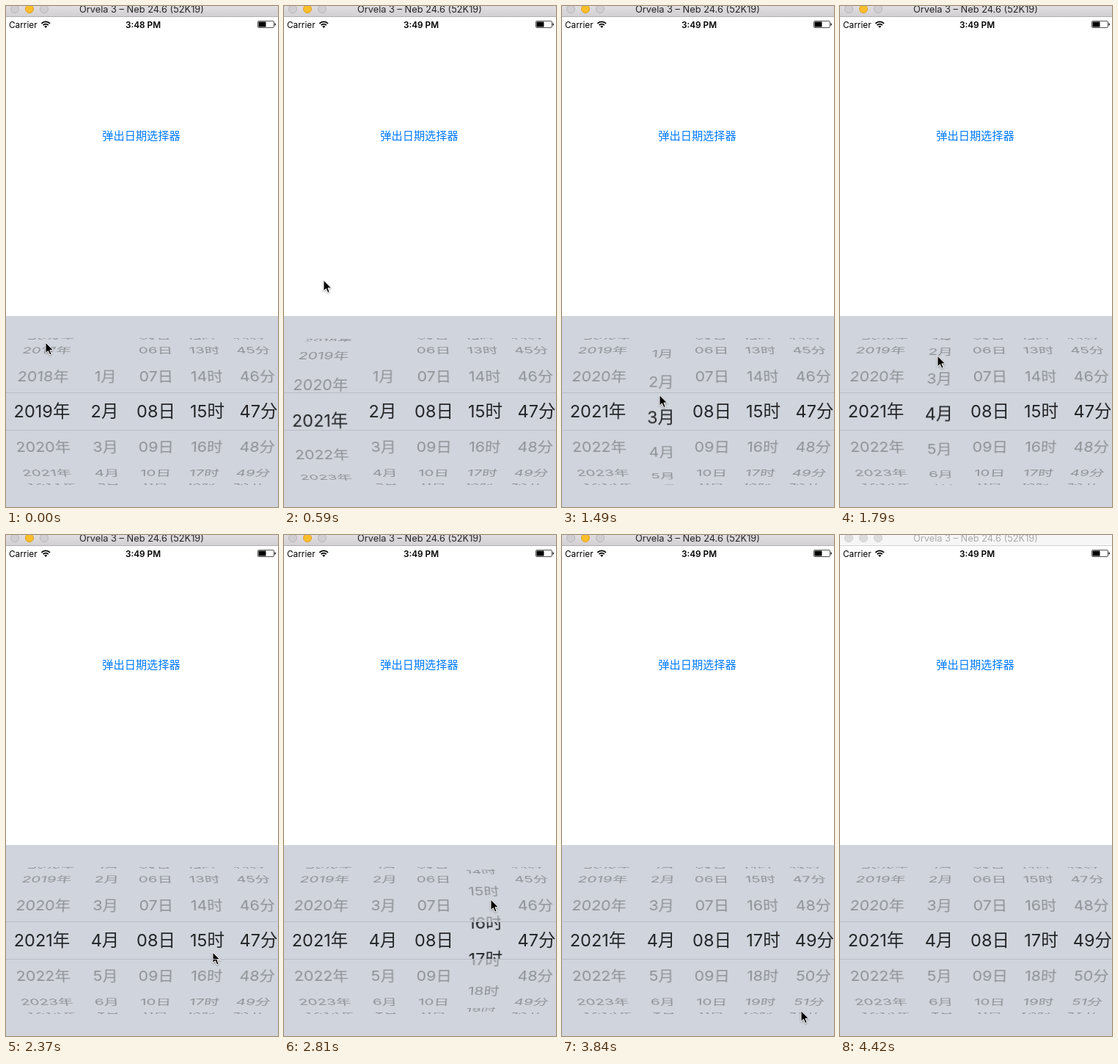
Animation, 371 px wide and 682 px high, one loop 4.52 s. Source, as an HTML page:

```html
<!DOCTYPE html>
<html lang="zh-CN">
<head>
<meta charset="utf-8">
<title>Date picker</title>
<style>
  html, body { margin: 0; width: 100%; height: 100%; overflow: hidden; background: #fff; }
  body { position: relative; font-family: Inter, "Noto Sans CJK SC", "Noto Sans CJK", sans-serif; }
  svg { position: absolute; left: 0; top: 0; font-family: inherit; }
  #sheet { position: absolute; top: 422px; width: 371px; height: 260px; background: #d0d4dc; }
  .wheel { position: absolute; left: 0; width: 371px; overflow: hidden; perspective: 810px; }
  #outer { top: 29px; height: 202px; font-size: 21.7px; color: #8f9196; }
  #band { top: 104px; height: 52px; font-size: 23.5px; color: #242528; background: #d0d4dc; }
  #sheet::before, #sheet::after {
    content: ""; position: absolute; z-index: 1; width: 371px; height: 1px; background: #b8bcc4;
  }
  #sheet::before { top: 104px; }
  #sheet::after { top: 155px; }
  .row {
    position: absolute; top: 50%; width: 120px; height: 34px; margin: -17px 0 0 -60px;
    line-height: 34px; text-align: center; white-space: pre;
  }
</style>
</head>
<body>
<svg width="371" height="422">
  <defs>
    <linearGradient id="chrome" x2="0" y2="1">
      <stop stop-color="#e0dee0"/><stop offset="1" stop-color="#d2d0d2"/>
    </linearGradient>
  </defs>
  <rect id="bar" width="371" height="14"/>
  <rect id="barEdge" y="14" width="371" height="1"/>
  <g id="lights">
    <circle cx="12" cy="4" r="5.5"/><circle cx="32" cy="4" r="5.5"/><circle cx="52" cy="4" r="5.5"/>
  </g>
  <text id="title" x="185" y="9" font-size="12.8" text-anchor="middle">Orvela 3 – Neb 24.6 (52K19)</text>
  <text x="4" y="29.6" font-size="11.8">Carrier</text>
  <g fill="none" stroke="#000" stroke-width="1.8">
    <path d="M48.4 23.8a8 8 0 0 1 11.6 0M50.6 26.2a5 5 0 0 1 7.2 0"/>
    <path d="M54.2 30l-2-2.2a2.8 2.8 0 0 1 4 0z" fill="#000" stroke="none"/>
  </g>
  <text id="clock" x="187" y="29.6" font-size="11.8" font-weight="600" text-anchor="middle"></text>
  <rect x="343.5" y="20.5" width="22" height="9" rx="1.5" fill="none" stroke="#555"/>
  <rect x="344.5" y="21.5" width="10" height="7"/>
  <path d="M366.5 23.2q1.5 .3 1.5 1.8t-1.5 1.8z"/>
  <text x="184.5" y="182" font-size="15.2" fill="#007aff" text-anchor="middle">弹出日期选择器</text>
</svg>
<div id="sheet">
  <div id="outer" class="wheel"></div>
  <div id="band" class="wheel"></div>
</div>
<svg width="371" height="682">
  <path id="cursor" d="M0 0V14.6L3.4 11.5L5.8 17L8.2 16L5.9 10.6H10.6Z" stroke="#fff"
        style="filter:drop-shadow(0 1px 1px #0005)"/>
</svg>
<script>
const LOOP = 4520, STEP = 147.5;                       // the screen refreshes once per STEP ms
const RADIUS = 113, ROW_ANGLE = 25.5, ROW_HEIGHT = 48.5, REACH = 4;
const $ = id => document.getElementById(id);

// A drag turns its wheel from one value to another between two refreshes.
const columns = [
  { x: 49, unit: '年', from: 2019, to: 2021, start: 0, end: 5.15, grab: { x: 54, y: 458 } },
  { x: 134.5, unit: '月', min: 1, from: 2, to: 4, start: 8, end: 12.5, grab: { x: 133, y: 570 } },
  { x: 204.5, unit: '日', pad: 2, from: 8, to: 8, start: 0, end: 1 },
  { x: 274.5, unit: '时', pad: 2, from: 15, to: 17, start: 16, end: 20.5, grab: { x: 282, y: 568 } },
  { x: 344.5, unit: '分', pad: 2, from: 47, to: 49, start: 22, end: 24.5, grab: { x: 352, y: 562 } }
];
const exit = { from: 0, to: 0, start: 28, end: 29, grab: { x: 286, y: 929 } };
const drags = [...columns.filter(c => c.grab), exit];

const mix = (a, b, u) => a + (b - a) * u;
function ease(step, start, end) {
  const u = Math.min(1, Math.max(0, (step - start) / (end - start)));
  return u * u * (3 - 2 * u);
}
const valueAt = (drag, step) => mix(drag.from, drag.to, ease(step, drag.start, drag.end));

// The pointer lifts the wheel it holds, then glides to the next one.
function pointerAt(step) {
  const i = drags.findLastIndex(drag => drag.start <= step);
  const held = drags[i], next = drags[i + 1] || held;
  const lifted = held.grab.y - ROW_HEIGHT * (valueAt(held, step) - held.from);
  const glide = ease(step, held.end, next.start);
  return [mix(held.grab.x, next.grab.x, glide), mix(lifted, next.grab.y, glide)];
}

function makeRows(wheel, x) {
  return Array.from({ length: 2 * REACH + 1 }, () => {
    const row = document.createElement('div');
    row.className = 'row';
    row.style.left = x + 'px';
    return wheel.appendChild(row);
  });
}
for (const c of columns) c.layers = [makeRows($('outer'), c.x), makeRows($('band'), c.x)];

function drawColumn(c, step) {
  const position = valueAt(c, step), first = Math.round(position) - REACH;
  for (const rows of c.layers) rows.forEach((row, i) => {
    const value = first + i, angle = (position - value) * ROW_ANGLE;
    const visible = value >= (c.min || 0) && Math.abs(angle) < 88;
    row.style.display = visible ? '' : 'none';
    row.textContent = String(value).padStart(c.pad || 1, '0') + c.unit;
    row.style.transform = `translateZ(${-RADIUS}px) rotateX(${angle}deg) translateZ(${RADIUS}px)`;
  });
}

function drawWindow(active) {
  $('bar').setAttribute('fill', active ? 'url(#chrome)' : '#f6f6f6');
  $('barEdge').setAttribute('fill', active ? '#b2b0b2' : '#d2d2d2');
  $('title').setAttribute('fill', active ? '#262626' : '#aaa');
  [...$('lights').children].forEach((light, i) => {
    const yellow = active && i === 1;
    light.setAttribute('fill', yellow ? '#fdbe2c' : active ? '#d0ced0' : '#dcdcdc');
    light.setAttribute('stroke', yellow ? '#e0a024' : active ? '#b8b6b8' : '#d0d0d0');
  });
}

let shown = -1;
function draw(now) {
  const step = Math.floor((now % LOOP) / STEP + 0.04);
  if (step !== shown) {
    shown = step;
    columns.forEach(c => drawColumn(c, step));
    $('cursor').setAttribute('transform', `translate(${pointerAt(step)})`);
    $('clock').textContent = step < 1 ? '3:48 PM' : '3:49 PM';
    drawWindow(step < 30);
  }
  requestAnimationFrame(draw);
}
draw(0);
</script>
</body>
</html>
```
